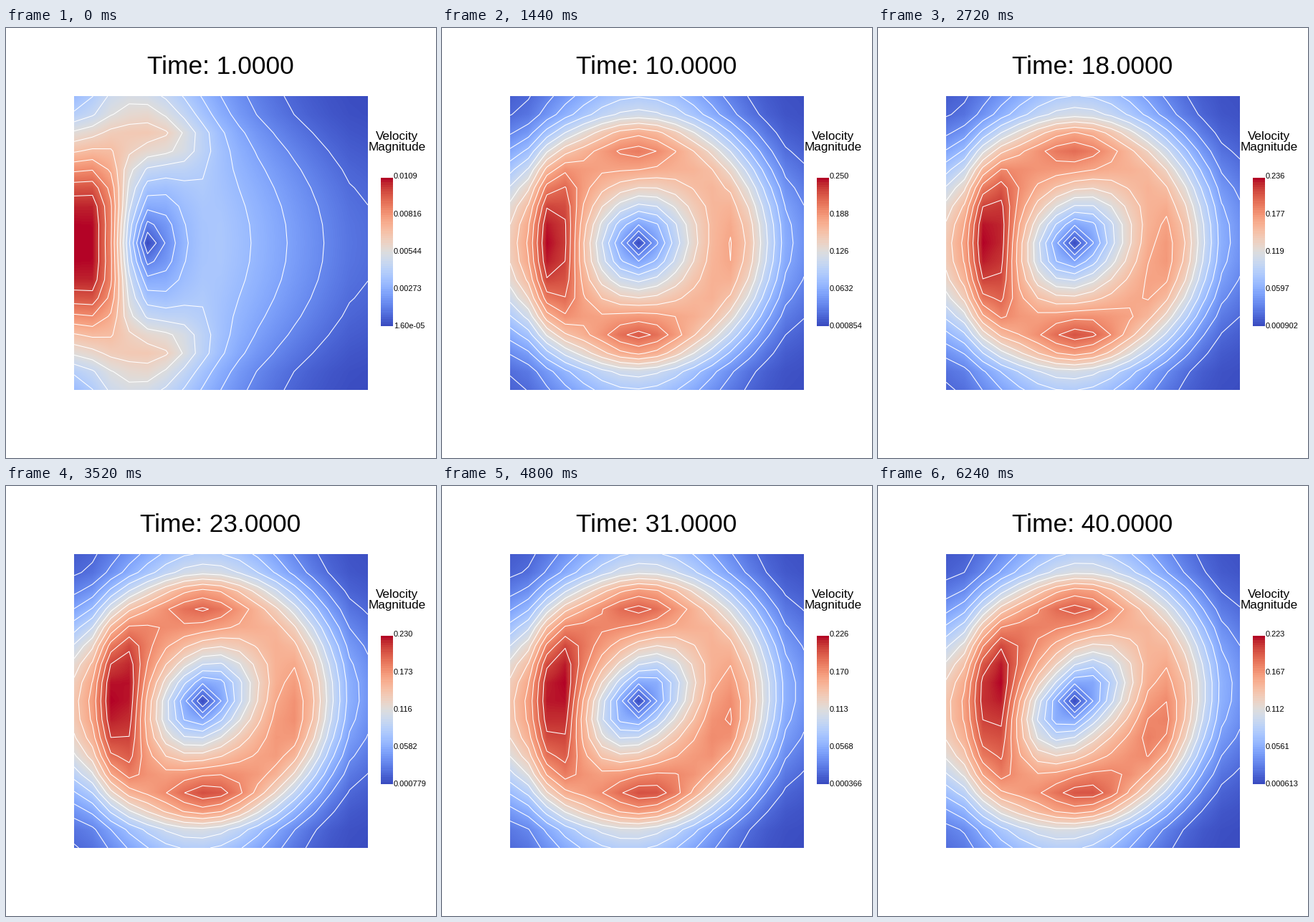
A matplotlib script for the animation above (6400 ms loop, 600 by 600 pixels).

```python
import numpy as np
import matplotlib.pyplot as plt
from matplotlib.animation import FuncAnimation

FRAMES, STEP_MS = 40, 160
LEFT, RIGHT = 95, 505          # the plotted square, in pixels
SIZE, CELLS = RIGHT - LEFT, 16
LEVELS = np.linspace(0, 1, 15)[1:-1]
CORE_X, MID_Y, RING = 274.4, 300, 128   # vortex core and radius of top speed

nodes = np.arange(CELLS + 1)
node_pos = LEFT + nodes * SIZE / CELLS
# Border nodes carry the value of the cell centres next to them.
inner_pos = LEFT + np.clip(nodes, .5, CELLS - .5) * SIZE / CELLS
X, Y = np.meshgrid(inner_pos, inner_pos)
# The core lies exactly on a node; all other terms are smooth.
DX, DY = X - CORE_X, MID_Y - Y
R = np.hypot(DX, DY) + 1e-9


def bump(cx, cy, sx, sy, px=2, py=2):
    return np.exp(-np.abs((X - cx) / sx) ** px - np.abs((Y - cy) / sy) ** py)


def normalise(field):
    return (field - field.min()) / np.ptp(field)


def startup():
    """Hot left lobe, dark hole beside it and a front bowed to the right."""
    front = X + 130 * (DY / 205) ** 2
    field = np.minimum(.8 * np.log1p(np.exp((545 - front) / 40)), 5)
    field += 9.2 * bump(117, MID_Y, 52, 126, 2.4, 3.3)
    hole = np.hypot((X - 197.5) / 36, DY / 55)
    field -= 5.4 * np.exp(-hole ** 1.3)
    for side in (-1, 1):
        field += 3.5 * bump(200, MID_Y + 154 * side, 82, 48)
        field -= 2.2 * bump(LEFT, MID_Y + 205 * side, 30, 30)
    return normalise(field)


def vortex(p):
    """Round vortex with four lobes; p runs from 0 (upright) to 1 (tilted)."""
    cos, sin2 = DX / R, 2 * DX * DY / R ** 2
    tilt = p * (.05 + .2 * np.exp(-(R / 100) ** 2))
    r = R * (1 - tilt * sin2)
    profile = np.where(r < RING, np.sin(np.pi / 2 * np.minimum(r / RING, 1)),
                       np.exp(-((r - RING) / 77) ** 2))
    field = profile * (9.3 + p - (.4 + .2 * p) * cos - .6 * p * sin2)
    field += (4.3 - .8 * p) * bump(156 + 9 * p, 300 + 5 * p, 31, 100)
    field += (1.6 + .6 * p) * bump(274 + 10 * p, 169, 50, 31)
    field += (2.6 - .3 * p) * bump(274 + 14 * p, 430, 50 + 10 * p, 31)
    field += (.6 + .9 * p) * bump(403 - 10 * p, 300 + 25 * p, 35, 60 + 20 * p)
    return normalise(field)


def speed(t):
    """Speed at the mesh nodes, scaled to 0..1."""
    if t >= 5:
        return vortex((t - 5) / 35)
    w = 1 - ((5 - t) / 4) ** 2
    return normalise((1 - w) * startup() + w * vortex(0))


def speed_range(t):
    low = np.interp(t, [1, 5, 10, 18, 23, 31, 40],
                    [1.6e-5, .000591, .000854, .000902,
                     .000779, .000366, .000613])
    high = np.interp(t, [1, 2, 3, 5, 10, 18, 23, 31, 40],
                     [.01087, .12, .2, .2530, .2502,
                      .2361, .2303, .2261, .2226])
    return low, high


# Linear interpolation from nodes to pixel centres.
pixels = (np.arange(SIZE) + .5) * CELLS / SIZE
to_pixels = np.clip(1 - np.abs(pixels[:, None] - nodes), 0, 1)

fig = plt.figure(figsize=(6, 6), dpi=100, facecolor="white")
ax = fig.add_axes([0, 0, 1, 1])
ax.axis("off")


def label(x, y, text, px, align="center"):
    return ax.text(x, y, text, fontsize=px * .72, family="Liberation Sans",
                   color="black", ha=align, va="baseline")


style = dict(cmap="coolwarm", vmin=0, vmax=1, aspect="auto",
             interpolation="nearest")
image = ax.imshow(np.zeros((SIZE, SIZE)),
                  extent=(LEFT, RIGHT, RIGHT, LEFT), **style)
ax.imshow(np.linspace(1, 0, 64)[:, None],
          extent=(523, 540, 416, 209), **style)

title = label(299.5, 64, "", 35.3)
label(546, 156, "Velocity", 17.1)
label(546, 171, "Magnitude", 17.1)
ticks = [label(541, 210.5 + 52.1 * k, "", 11, "left") for k in range(5)]
lines = []


def draw(frame):
    t = frame + 1
    field = speed(t)
    image.set_data(to_pixels @ field @ to_pixels.T)
    while lines:
        lines.pop().remove()
    lines.append(ax.contour(node_pos, node_pos, field, levels=LEVELS,
                            colors="white", linewidths=.75))
    ax.set_xlim(0, 600)
    ax.set_ylim(600, 0)
    title.set_text(f"Time: {t:.4f}")
    low, high = speed_range(t)
    for tick, value in zip(ticks, np.linspace(high, low, 5)):
        tick.set_text(f"{value:#.3g}")
    return []


anim = FuncAnimation(fig, draw, frames=FRAMES, interval=STEP_MS,
                     repeat=True, repeat_delay=0, blit=False)
plt.show()
```
